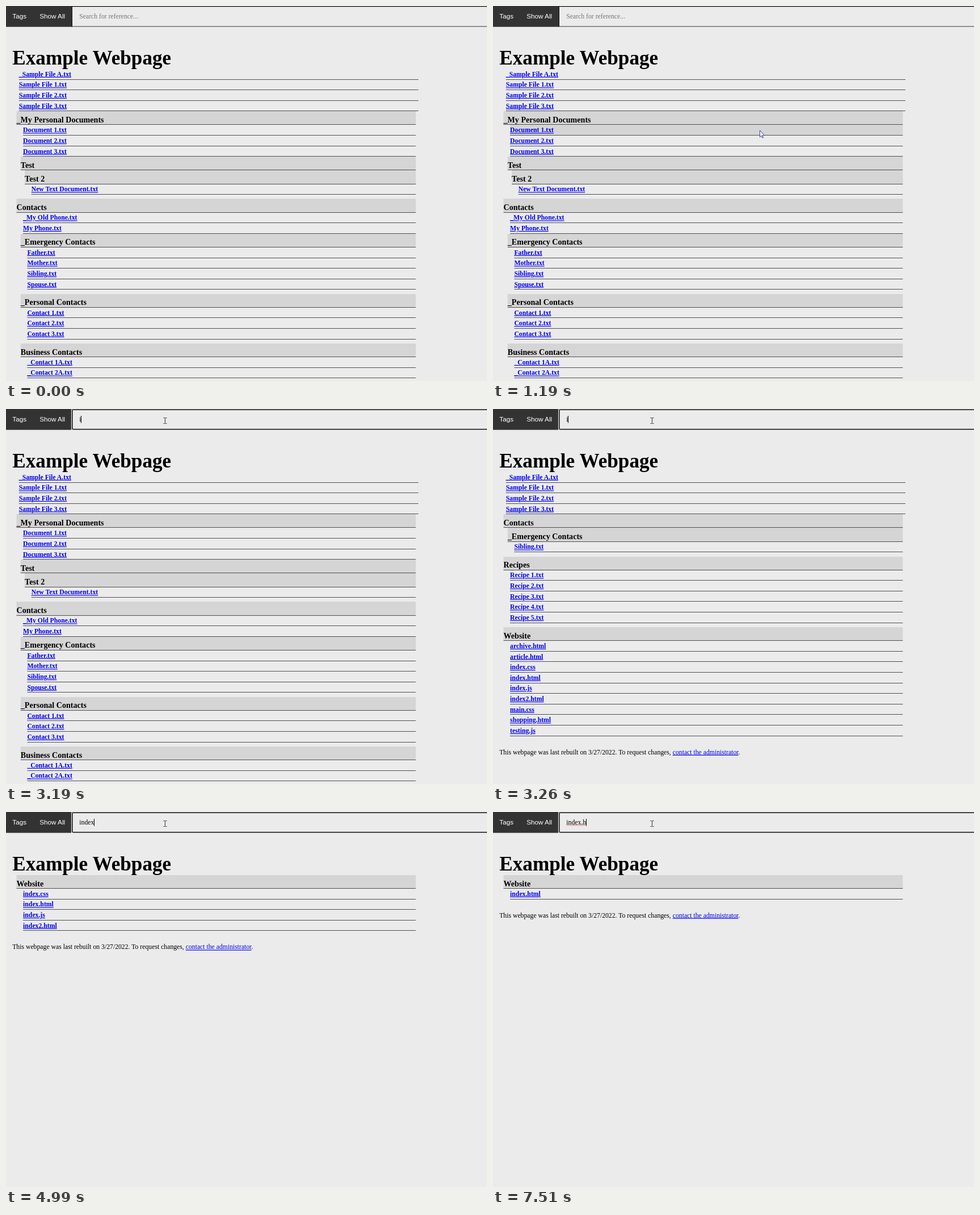
These frames come from a looping animation (848x660 px, 8 s). An HTML page:

```html
<!DOCTYPE html>
<html lang="en">
<head>
<meta charset="utf-8">
<title>Example Webpage</title>
<style>
  html, body { margin: 0; width: 100%; height: 100%; overflow: hidden; background: #ebebeb; }
  svg { display: block; }
  text { font: 11.72px "Liberation Serif", "Times New Roman", serif; white-space: pre; }
  .nav { font-family: "Liberation Sans", Arial, sans-serif; fill: #fff; }
  .title { font-size: 35.2px; font-weight: bold; }
  .head { font-size: 14.08px; font-weight: bold; }
  .link { fill: #00e; text-decoration: underline; }
  .file { font-weight: bold; }
  .hint { fill: #757575; }
  .band { fill: #d5d5d5; }
  .line { fill: #505050; }
</style>
</head>
<body>
<svg id="stage" width="848" height="660" viewBox="0 0 848 660">
  <rect width="848" height="660" fill="#ebebeb"/>
  <text class="title" x="11.3" y="103">Example Webpage</text>
  <rect id="hover" class="band"/>
  <g id="list"></g>

  <rect width="116" height="36.7" fill="#333"/>
  <g id="idle">
    <rect x="116" width="732" height="1.3" fill="#111"/>
    <rect x="116" y="35.4" width="732" height="1.2" fill="#555"/>
    <rect x="116" width="1" height="36.6" fill="#111"/>
  </g>
  <text class="nav" x="11.3" y="22">Tags</text>
  <text class="nav" x="59.2" y="22">Show All</text>
  <g id="ring">
    <rect x="115" width="760" height="36.9" rx="1.5" fill="#fff"/>
    <rect x="116" y=".5" width="760" height="35.9" rx="1.8" fill="#101010"/>
    <rect x="117.6" y="2" width="760" height="32.9" fill="#ebebeb"/>
  </g>
  <text id="entry" x="129.3" y="22"></text>
  <path id="squiggle" fill="none" stroke="#e33" stroke-width=".8"/>
  <rect id="caret" y="12" width="1" height="12.6"/>

  <path id="arrow" d="M0 0V11.7L2.6 9.3L4.4 13.2L6 12.5L4.3 8.7H8Z"
        fill="#fff" stroke="#26269a" stroke-width=".9" stroke-linejoin="round"/>
  <path id="beam" d="M-3 -4.5H-.8L0 -4L.8 -4.5H3M0 -4V5M-3 5.5H-.8L0 5L.8 5.5H3"
        fill="none" stroke="#333" stroke-width="1"/>
</svg>
<script>
const LOOP = 8000, LIST_TOP = 109.9, ROW = 18.62, HEAD = 24.1, GAP = 7.3, TEXT_X = 129.3;
const $ = id => document.getElementById(id);
const numbered = (name, n) => Array.from({ length: n }, (_, i) => `${name} ${i + 1}.txt`);

// depth, heading, files
const GROUPS = [
  [0, "", ["_Sample File A.txt", ...numbered("Sample File", 3)]],
  [1, "_My Personal Documents", numbered("Document", 3)],
  [2, "Test", []],
  [3, "Test 2", ["New Text Document.txt"]],
  [1, "Contacts", ["_My Old Phone.txt", "My Phone.txt"]],
  [2, "_Emergency Contacts", ["Father.txt", "Mother.txt", "Sibling.txt", "Spouse.txt"]],
  [2, "_Personal Contacts", numbered("Contact", 3)],
  [2, "Business Contacts", ["_Contact 1A.txt", "_Contact 2A.txt"]],
  [1, "Recipes", numbered("Recipe", 5)],
  [1, "Website", ["archive.html", "article.html", "index.css", "index.html", "index.js",
    "index2.html", "main.css", "shopping.html", "testing.js"]]
];

// time typed, text, time the list follows
const TYPING = [
  [0, "", 0], [3190, "i", 3260], [3660, "in", 3730], [4130, "ind", 4200], [4530, "inde", 4530],
  [4990, "index", 4990], [5850, "index.", 5980], [6380, "index.h", 6450]
];
const FOCUS = 2140, MISSPELT = 7440;
const CARET_OFF = [[2730, 3190], [5520, 5850], [6980, 7510]];

// time, x, y of the pointer
const PATH = [
  [380, 822, 648], [745, 665, 398], [1122, 498, 248], [1190, 470.5, 219],
  [1400, 400, 157], [1540, 360, 116], [1690, 304, 48], [1810, 280.5, 20]
];

let rows = [], shown = null;

function add(tag, attrs, text) {
  const el = document.createElementNS("http://www.w3.org/2000/svg", tag);
  for (const key in attrs) el.setAttribute(key, attrs[key]);
  if (text) el.textContent = text;
  return $("list").appendChild(el);
}

function filterGroups(query) {
  const hits = GROUPS.map(([depth, name, files]) => [depth, name, files.filter(f => f.includes(query))]);
  return hits.filter(([depth, , files], i) => {
    if (files.length) return true;
    for (let j = i + 1; j < hits.length && hits[j][0] > depth; j++) if (hits[j][2].length) return true;
    return false;
  });
}

function buildList(query) {
  $("list").replaceChildren();
  rows = [];
  let y = LIST_TOP, last = 0;
  for (const [depth, name, files] of filterGroups(query)) {
    const left = 11.2 + 7.3 * depth, right = depth ? 722.5 : 727;
    const rule = x => add("rect", { class: "line", x, y: Math.round(y), width: right - x, height: 1 });
    if (name) {
      if (depth <= last) y += GAP;
      const top = Math.round(y) + 1;
      y += HEAD;
      add("rect", { class: "band", x: left, y: top, width: right - left, height: Math.round(y) - top });
      rule(left);
      add("text", { class: "head", x: left, y: y - 3.5 }, name);
    }
    for (const file of files) {
      const top = Math.round(y) + 1, x = left + 11.6;
      y += ROW;
      rule(x);
      add("text", { class: "link file", x, y: y - 4.8 }, file);
      rows.push({ x, top, right, bottom: Math.round(y) });
    }
    last = depth;
  }
  const foot = add("text", { x: 11.2, y: y + 33 }, "This webpage was last rebuilt on 3/27/2022. To request changes, ");
  const link = add("tspan", { class: "link" }, "contact the administrator");
  foot.append(link, ".");
}

function pointerAt(t) {
  // The pointer moves in discrete steps
  const [from, step] = t < 1190 ? [380, 67.5] : [1190, 68.9];
  const time = Math.min(1810, from + Math.floor((t - from + 1) / step) * step);
  const i = Math.max(1, PATH.findIndex(p => p[0] >= time - .5));
  const [t0, x0, y0] = PATH[i - 1], [t1, x1, y1] = PATH[i];
  const k = Math.min(1, (time - t0) / (t1 - t0));
  return [x0 + (x1 - x0) * k, y0 + (y1 - y0) * k];
}

const show = (id, on) => $(id).setAttribute("visibility", on ? "visible" : "hidden");
const latest = (t, column) => TYPING.filter(s => s[column] <= t).pop()[1];

function drawEntry(t) {
  const text = latest(t, 0), entry = $("entry"), focused = t >= FOCUS;
  const label = text || "Search for reference...";
  if (entry.textContent !== label) entry.textContent = label;
  entry.setAttribute("class", text ? "" : "hint");
  const width = text ? entry.getComputedTextLength() : 0;
  $("caret").setAttribute("x", Math.floor(TEXT_X + width));
  show("caret", focused && !CARET_OFF.some(([a, b]) => t >= a && t < b));
  show("ring", focused);
  show("idle", !focused);

  let zigzag = `M${TEXT_X} 23.8`;
  for (let x = 1.4, up = true; x < width; x += 1.4, up = !up) zigzag += `L${TEXT_X + x} ${up ? 22.6 : 23.8}`;
  $("squiggle").setAttribute("d", zigzag);
  show("squiggle", t >= MISSPELT);
}

function drawPointer(t) {
  const active = t >= 380, [x, y] = pointerAt(Math.max(380, t));
  const typing = y < 37;
  $(typing ? "beam" : "arrow").setAttribute("transform", `translate(${x} ${y})`);
  show("beam", active && typing);
  show("arrow", active && !typing);

  const row = active && rows.find(r => x >= r.x && x < r.right && y >= r.top && y <= r.bottom);
  show("hover", row);
  if (!row) return;
  const box = { x: row.x, y: row.top, width: row.right - row.x, height: row.bottom - row.top };
  for (const key in box) $("hover").setAttribute(key, box[key]);
}

function draw() {
  const t = performance.now() % LOOP;
  const query = latest(t, 2);
  if (query !== shown) buildList(shown = query);
  drawEntry(t);
  drawPointer(t);
  requestAnimationFrame(draw);
}
draw();
</script>
</body>
</html>
```
